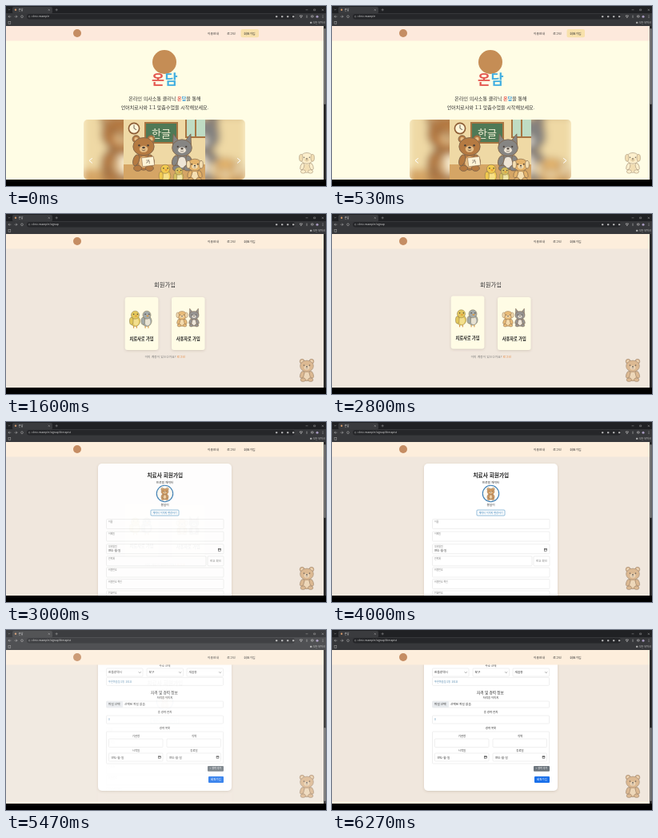
These frames come from a looping animation (400x225 px, 6.47 s). An HTML page:

```html
<!DOCTYPE html>
<html lang="ko">
<head>
<meta charset="utf-8">
<title>온담</title>
<style>
  html, body { margin: 0; width: 100%; height: 100%; overflow: hidden; background: #000; }
  svg { display: block; width: 100%; height: 100%; }
  text { font-family: "Noto Sans CJK KR", "Noto Sans CJK", "Noto Sans", sans-serif; white-space: pre; }
</style>
</head>
<body>
<svg id="stage" viewBox="0 0 400 225"></svg>
<script>
const LOOP = 6470;
const BROWN = '#b98450';
const INK = '#4a4038';

const rect = (x, y, w, h, fill, extra = '') =>
  `<rect x="${x}" y="${y}" width="${w}" height="${h}" fill="${fill}" ${extra}/>`;
const oval = (x, y, rx, ry, fill, extra = '') =>
  `<ellipse cx="${x}" cy="${y}" rx="${rx}" ry="${ry}" fill="${fill}" ${extra}/>`;
const dot = (x, y, r, fill, extra) => oval(x, y, r, r, fill, extra);
const line = (d, stroke, width = .5) =>
  `<path d="${d}" fill="none" stroke="${stroke}" stroke-width="${width}" stroke-linecap="round"/>`;
const text = (x, y, size, str, fill = '#333', anchor = 'start', weight = 400) =>
  `<text x="${x}" y="${y}" font-size="${size}" fill="${fill}" text-anchor="${anchor}" font-weight="${weight}">${str}</text>`;
const centred = (x, y, size, str, fill, weight) => text(x, y, size, str, fill, 'middle', weight);
const group = (body, attrs) => `<g ${attrs}>${body}</g>`;

// Animals are drawn in a unit about 20 wide and 26 high, centred on the origin.
function face(muzzle) {
  return oval(0, -4, 3.4, 2.6, muzzle) + oval(0, -5.2, 1.2, .8, INK) +
    dot(-3.6, -7, .8, INK) + dot(3.6, -7, .8, INK) + line('M-1.2-3.2Q0-2 1.2-3.2', INK, .4);
}
function ears(kind, fill, inner, edge) {
  return [-1, 1].map(side => {
    if (kind === 'round') return dot(side * 6, -12, 3, fill, edge) + dot(side * 6, -12, 1.5, inner);
    if (kind === 'floppy') return oval(side * 7.6, -6.5, 2.3, 4.6, inner, edge);
    return `<path d="M${side * 2}-11L${side * 7.5}-18L${side * 8}-7Z" fill="${fill}" ${edge}/>`;
  }).join('');
}
function animal(x, y, scale, kind, fill, inner, extra = '') {
  const edge = `stroke="#80654a" stroke-width=".6"`;
  const limbs = [-1, 1].map(s =>
    oval(s * 6, 5, 2.4, 4.6, fill, `${edge} transform="rotate(${s * -18} ${s * 6} 5)"`) +
    oval(s * 4.8, 11.5, 3.2, 2.3, fill, edge)).join('');
  const head = oval(0, -6, 8.5, 7.2, fill, edge);
  const earShapes = ears(kind, fill, inner, edge);
  return group(
    oval(0, 6, 6.6, 7, fill, edge) + oval(0, 6.5, 3.8, 4.6, inner) + limbs +
    (kind === 'floppy' ? head + earShapes : earShapes + head) + face(inner),
    `transform="translate(${x} ${y}) scale(${scale})" ${extra}`);
}
function bird(x, y, scale, fill, belly) {
  const edge = `stroke="#80704a" stroke-width=".5"`;
  return group(
    oval(0, 4, 6.5, 7, fill, edge) + oval(1, 5, 3.7, 5, belly) + dot(0, -4, 5.3, fill, edge) +
    oval(-5, 4, 2.4, 4.8, fill, edge) + dot(-2, -5, .8, INK) + dot(3, -5, .8, INK) +
    `<path d="M-1-3.5h4l-2 2.2z" fill="#e69a35"/>` + line('M-2 11v2M2 11v2', '#d08a30', 1),
    `transform="translate(${x} ${y}) scale(${scale})"`);
}

function browser(url) {
  return rect(0, 0, 400, 217, '#202124') +
    rect(8, 1, 50, 8.5, '#3a3b3e', 'rx="2"') + rect(0, 9, 400, 16, '#37383b') +
    rect(26, 10, 335, 6.6, '#252629', 'rx="3.3"') +
    dot(12, 4.8, 1.2, '#c89368') + text(15.5, 6, 3.3, '온담', '#ddd') +
    line('M53 4l1.6 1.6M54.6 4L53 5.6M62 4.8h2.4M63.2 3.6v2.4M3 4.2l1 1 1-1', '#bbb', .4) +
    line('M6 13.2H3l1.2-1.2M3 13.2l1.2 1.2M11 13.2h3l-1.2-1.2M14 13.2l-1.2 1.2', '#bbb', .5) +
    dot(20, 13.2, 1.4, 'none', 'stroke="#bbb" stroke-width=".5"') +
    dot(29.2, 13.2, .9, 'none', 'stroke="#aaa" stroke-width=".4"') +
    text(32, 14.4, 3.3, url, '#d8d8d8') +
    [338, 345, 352, 359].map(x => rect(x - 1, 12.2, 2.4, 2, '#b8b8b8', 'rx=".6"')).join('') +
    line('M367.5 12h3l-1.5 2.5zM376 12v2.5M382 12h2v2h-2z', '#c8c8c8', .6) +
    dot(389, 13.2, 1.5, '#a79abf') + line('M396 11.8v.1M396 13.2v.1M396 14.6v.1', '#ccc', .6) +
    line('M375 4.8h2M385 4h1.7v1.7H385zM395 4l1.7 1.7M396.7 4L395 5.7', '#bbb', .4) +
    rect(3, 19.5, 2.8, 2.8, 'none', 'stroke="#aaa" stroke-width=".5"') +
    rect(380, 19.8, 2.4, 2, '#aaa') + text(384, 22, 3, '모든 북마크', '#ccc');
}
function page(url, background, header, body, thumb) {
  return browser(url) + rect(0, 25, 397, 192, background) + body +
    rect(0, 25, 397, 18.5, header) + dot(89, 34, 5, '#c58d63') +
    centred(259, 35.7, 3.8, '이용안내', '#333', 500) + centred(281.5, 35.7, 3.8, '로그인', '#333', 500) +
    centred(304.5, 35.7, 3.95, '회원가입', '#333', 500) +
    rect(397, 25, 3, 192, '#2b2b2b') + (thumb ? rect(397.6, thumb[0], 1.8, thumb[1], '#929292', 'rx=".9"') : '');
}

function classroom() {
  return rect(147, 142, 102, 76, '#efd9a5') + rect(147, 198, 102, 20, '#d5a565') +
    rect(173, 145, 42, 27, '#a87542') + rect(175, 147, 38, 23, '#4f7956') +
    centred(194, 164, 13, '한글', '#f2efd4', 500) +
    dot(160, 153, 7.4, '#8b5c35') + dot(160, 153, 5.8, '#fff5d8') + line('M160 149v4l2.7 1.5', INK, .8) +
    rect(224, 142, 25, 23, '#a87542') + rect(226, 142, 10, 21, '#bfdcc4') + rect(238, 142, 11, 21, '#bfdcc4') +
    animal(172, 185, 1.55, 'round', '#b57a42', '#e6bd85') +
    animal(220, 186, 1.45, 'pointed', '#868583', '#eee5d6') +
    bird(199, 208, 1.05, '#f1c94f', '#f8df86') + bird(216, 210, .9, '#d3bd60', '#efe3a6') +
    animal(236, 205, 1.05, 'floppy', '#e4b36b', '#f5dfb2') +
    group(rect(170, 189, 15, 11, '#fff4d7', 'stroke="#98744d" stroke-width=".6"') +
      centred(177.5, 197, 6, '가', INK), 'transform="rotate(-7 177 194)"');
}

function home() {
  const arrows = line('M107.5 190.5l-3.5 2.8 3.5 2.8M289.5 190.5l3.5 2.8-3.5 2.8', '#fff', 1);
  const carousel = group(
    group(classroom(), 'transform="translate(-198 -192) scale(2)" filter="url(#blur)"') +
    group(classroom(), 'clip-path="url(#photo)"') + arrows, 'clip-path="url(#carousel)"');
  const body = dot(198, 70, 15, '#c58d55') +
    centred(190, 98, 17.5, '온', '#e4574f', 900) + centred(206.5, 98, 17.5, '담', '#43afe0', 900) +
    centred(198.5, 118.2, 6.05,
      '온라인 의사소통 클리닉 <tspan fill="#e4574f" font-weight="800">온</tspan><tspan fill="#3b9bd8" font-weight="800">담</tspan>을 통해', '#333', 500) +
    centred(198.5, 129, 6.05, '언어치료사와 1:1 맞춤수업을 시작해보세요.', '#333', 500) +
    carousel + animal(376, 196, .95, 'floppy', '#fbebc6', '#f0d5a4', 'opacity=".75"');
  return page('clinic.example', '#fffde5', '#fde9dc', body, [28, 95]) +
    rect(293.5, 29, 22.5, 10.3, '#f8e1ab', 'rx="2"') + centred(304.5, 35.7, 3.95, '회원가입', '#333', 500);
}

const helperBear = () => animal(376, 196, .98, 'round', '#d6aa79', '#edd2ae', 'opacity=".75"');

function signup() {
  const card = (x, label, art) => rect(x, 104, 41.5, 66, '#fffce5', 'rx="3" filter="url(#shadow)"') +
    art + centred(x + 20.7, 158.4, 5.2, label, '#222', 700);
  const body = centred(198.5, 91, 7.3, '회원가입') +
    group(card(148.8, '치료사로 가입',
      bird(161.5, 130, .95, '#e3c85c', '#f3df8d') + bird(176, 130, .95, '#a3aaa9', '#e8e2d2')), 'id="hoverCard"') +
    card(207, '사용자로 가입',
      animal(220, 131, .72, 'floppy', '#e8bb78', '#f4dbae') + animal(235, 131, .72, 'pointed', '#969391', '#eee6da')) +
    centred(198.8, 179.7, 3.8, '이미 계정이 있으신가요? <tspan fill="#e58a45">로그인</tspan>', '#777') + helperBear();
  return page('clinic.example/signup', '#f0e7dd', '#fdeedc', body);
}

const field = (x, y, w, h = 12, fill = '#fff') =>
  rect(x, y, w, h, fill, 'rx="1" stroke="#dfdfdf" stroke-width=".5"');
const calendar = (x, y) => rect(x - 1.4, y - 1.2, 2.8, 2.7, 'none', 'stroke="#333" stroke-width=".5"') +
  line(`M${x - 1.3} ${y - .7}h2.6`, '#333', .8);

function form() {
  const labels = [['이름', 121.5], ['이메일', 137], ['생년월일', 152.7], ['연락처', 167.8],
    ['비밀번호', 182], ['비밀번호 확인', 196.5], ['전화번호', 211]];
  const fields = labels.map(([label, y]) =>
    field(125.5, y, label === '연락처' ? 124.5 : 146.5) + text(128, y + 4.3, 2.9, label, '#777')).join('');
  const body = rect(115, 52, 167, 175, '#fff', 'rx="5" filter="url(#shadow)"') +
    centred(198.8, 69, 6.65, '치료사 회원가입', '#222', 700) +
    centred(198.5, 76.7, 3.7, '프로필 캐릭터') +
    dot(198.5, 89.5, 10.2, '#fffaf2', 'stroke="#397db5" stroke-width="1.1"') +
    animal(198.5, 90.2, .53, 'round', '#cf9a61', '#edcfa5') +
    centred(198.5, 105.2, 3.7, '몽실이') +
    rect(181, 110, 35, 7, '#fff', 'rx="1" stroke="#4b91c4" stroke-width=".6"') +
    centred(198.5, 114.7, 3.1, '캐릭터 이미지 변경하기', '#347fb7') + fields +
    text(128, 161.8, 3.5, '연도-월-일') + calendar(267, 159.7) +
    field(252, 167.8, 20) + centred(262, 175.2, 3.6, '번호 확인', '#888') + helperBear();
  return page('clinic.example/signup/therapist', '#f0e7dd', '#fdeedc', body, [28, 92]);
}

function career() {
  const select = (x, label) => field(x, 48, 45.5, 10) + text(x + 2.5, 54.4, 3.7, label) +
    line(`M${x + 40.5} 52.5l1.2 1.2 1.2-1.2`, '#444', .5);
  const column = (x, name, date) => centred(x + 34, 133.7, 3.4, name) + field(x, 136, 67.5, 10.5) +
    centred(x + 34, 152.4, 3.4, date) + field(x, 154, 67.5, 10) +
    text(x + 3, 160.5, 3.6, '연도-월-일') + calendar(x + 63.5, 159);
  const button = (x, y, w, h, fill, label, size) => rect(x, y, w, h, fill, 'rx="1"') +
    centred(x + w / 2, y + h / 2 + size * .36, size, label, '#fff');
  const body = rect(115, 35, 167, 166, '#fff', 'rx="5" filter="url(#shadow)"') +
    centred(198.5, 46, 3.5, '주소 선택') +
    select(125.5, '한들광역시') + select(176, '북구') + select(226, '새움동') +
    field(125.5, 59.3, 146, 10) + text(128, 65.5, 3.2, '푸른마을집 1동 101호', '#5589ae') +
    centred(198, 80, 4.65, '자격 및 경력 정보') + centred(198.5, 86.3, 3.4, '자격증 이미지') +
    field(125.5, 89, 146, 8) + rect(125.5, 89, 20.5, 8, '#e9ecef', 'rx="1"') +
    text(128, 94.4, 3.7, '파일 선택') + text(148, 94.4, 3.7, '선택된 파일 없음') +
    centred(198.5, 104.4, 3.4, '총 경력 연차') + field(125.5, 107, 146, 10) + text(128, 113.4, 3.4, '0', '#5589ae') +
    centred(198.5, 124.2, 3.4, '경력 목록') + field(125.5, 127, 146, 40) +
    column(128.5, '기관명', '시작일') + column(201, '직책', '종료일') +
    button(252, 170, 20, 6.7, '#6c757d', '+ 경력 추가', 3.1) +
    button(253, 183, 19, 8, '#1a70ea', '회원가입', 3.5) +
    rect(0, 214, 397, 3, '#fdf0de') + helperBear();
  return page('clinic.example/signup/therapist', '#f0e7dd', '#fdeedc', body, [122, 92]);
}

const scenes = { home, signup, form, career };
document.getElementById('stage').innerHTML = `<defs>
  <filter id="blur"><feGaussianBlur stdDeviation="2.4"/></filter>
  <filter id="shadow" x="-20%" y="-20%" width="140%" height="140%">
    <feDropShadow dx="0" dy="1" stdDeviation="1.8" flood-color="#6b5136" flood-opacity=".2"/></filter>
  <clipPath id="carousel"><rect x="97" y="142" width="202" height="75" rx="5"/></clipPath>
  <clipPath id="photo"><rect x="147" y="142" width="102" height="75"/></clipPath>
  <clipPath id="window"><rect width="400" height="217"/></clipPath>
</defs>` + rect(0, 0, 400, 225, '#000') + rect(0, 0, 400, 217, '#fff') +
  Object.entries(scenes).map(([id, draw]) => group(draw(), `id="${id}" clip-path="url(#window)"`)).join('');

const layers = Object.fromEntries(Object.keys(scenes).map(id => [id, document.getElementById(id)]));
const hoverCard = document.getElementById('hoverCard');
const progress = (t, from, to) => Math.min(1, Math.max(0, (t - from) / (to - from)));

function show(layer, opacity) {
  layer.style.display = opacity > 0 ? '' : 'none';
  layer.style.opacity = opacity;
}
function render(t) {
  const toSignup = progress(t, 570, 1090);
  const toForm = progress(t, 2810, 3010);
  const toCareer = progress(t, 5030, 5550);
  show(layers.home, toSignup < 1 ? 1 : 0);
  show(layers.signup, toForm < 1 ? toSignup : 0);
  // The last dissolve fades both pages over white.
  show(layers.form, toForm * (1 - toCareer));
  show(layers.career, toCareer);
  hoverCard.setAttribute('transform', `translate(0 ${t >= 2790 ? -1.4 : 0})`);
}

const start = performance.now();
function tick() {
  render((performance.now() - start) % LOOP);
  requestAnimationFrame(tick);
}
tick();
</script>
</body>
</html>
```
